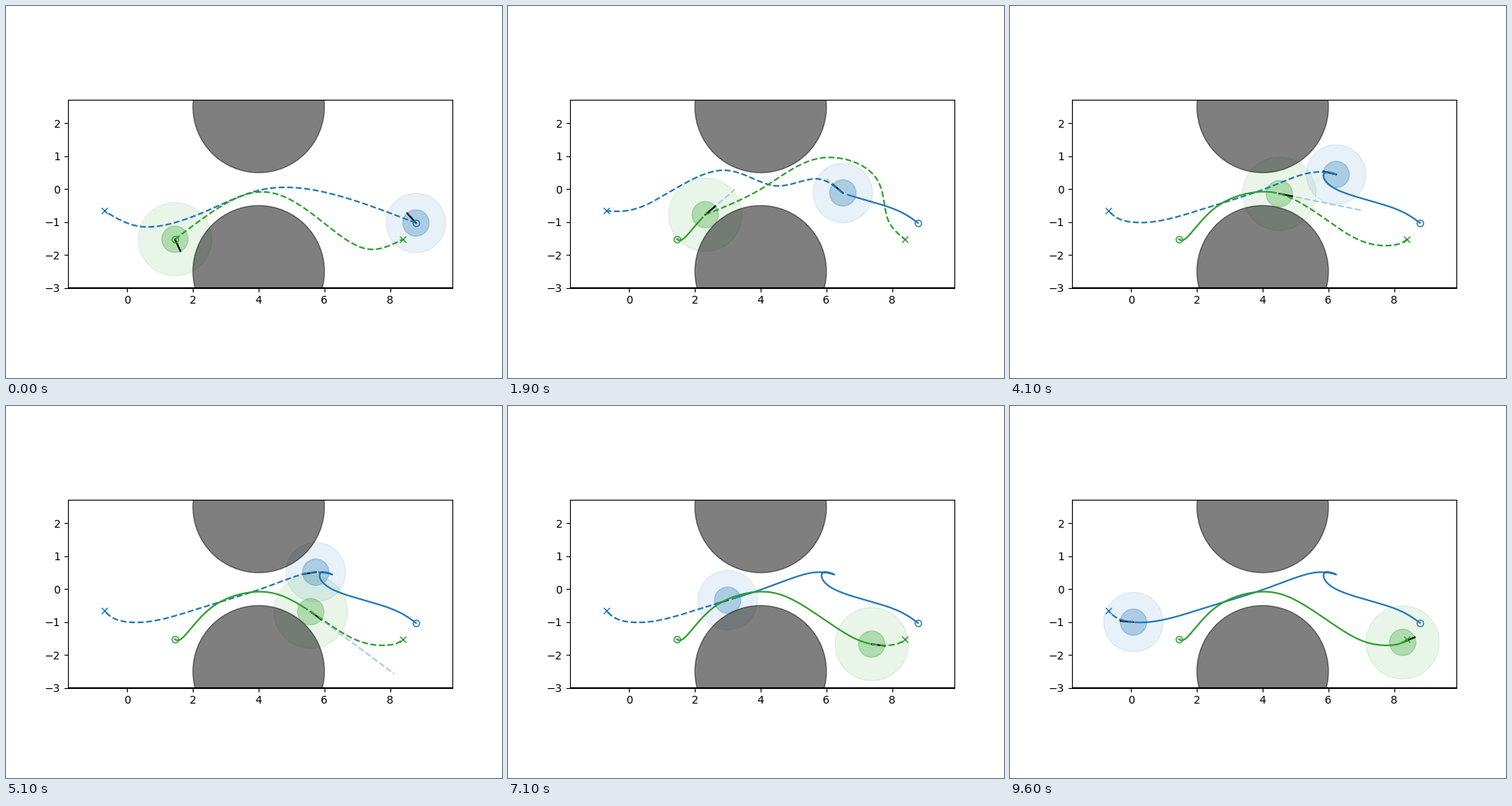
Write a matplotlib script that moves like this. It is 640 px wide and 480 px high and loops after 9700 ms.

```python
import numpy as np
import matplotlib.pyplot as plt
from matplotlib.animation import FuncAnimation
from matplotlib.patches import Circle

FRAMES, STEP = 97, 0.1
SCALE, X0, Y0 = 42.42, 156.35, 236.3   # stage pixels per unit, stage origin
POSE_STEP = 1.05                       # seconds between key poses
ROUTE_TIMES = (0, 1.9, 3.2)            # when each detour is planned
HEADING_LEN = 0.4

fig, ax = plt.subplots(figsize=(6.4, 4.8), dpi=100)
ax.set_xlim(-1.8, 9.893)
ax.set_ylim(-3, 2.712)
ax.set_aspect("equal")


def to_data(points):
    """Stage pixels to data units; further columns stay as they are."""
    p = np.array(points, float)
    p[:, 0] = (p[:, 0] - X0) / SCALE
    p[:, 1] = (Y0 - p[:, 1]) / SCALE
    return p


def spline(u, p):
    """Natural cubic spline through points p at knots u."""
    n, h = len(u), np.diff(u)
    slope = np.diff(p, axis=0) / h[:, None]
    a, rhs = np.eye(n), np.zeros_like(p)
    for i in range(1, n - 1):
        a[i, i - 1:i + 2] = h[i - 1], 2 * (h[i - 1] + h[i]), h[i]
        rhs[i] = 6 * (slope[i] - slope[i - 1])
    m = np.linalg.solve(a, rhs)

    def curve(s):
        s = np.atleast_1d(s)
        i = np.clip(np.searchsorted(u, s, side="right") - 1, 0, n - 2)
        w = h[i][:, None]
        b = (s - u[i])[:, None] / w
        c = 1 - b
        bend = ((c**3 - c) * m[i] + (b**3 - b) * m[i + 1]) * w**2 / 6
        return c * p[i] + b * p[i + 1] + bend

    return curve


def arc(p):
    """Length along a polyline at each of its points."""
    return np.r_[0, np.cumsum(np.hypot(*np.diff(p, axis=0).T))]


def resample(p, n=240):
    d = arc(p)
    s = np.linspace(0, d[-1], n)
    return np.column_stack([np.interp(s, d, col) for col in p.T])


def smooth(p):
    u = np.r_[0, np.cumsum(np.sqrt(np.diff(arc(p))))]
    return resample(spline(u, p)(np.linspace(0, u[-1], 400)))


class Agent:
    """Drives through key poses (x, y, heading) evenly spaced in time."""

    def __init__(self, color, radius, poses, routes, guess_color, guess_rate,
                 guess_end):
        times = POSE_STEP * np.arange(len(poses))
        self.end = times[-1]
        self.pose = spline(times, to_data(poses))
        self.vias = np.array([to_data(r).ravel() for r in routes])
        self.guess_rate, self.guess_end = guess_rate, guess_end

        self.ring = ax.add_patch(Circle((0, 0), radius, color=color, alpha=0.1))
        self.disc = ax.add_patch(Circle((0, 0), 0.4, color=color, alpha=0.3))
        self.guess, = ax.plot([], [], "--", color=guess_color)
        self.nose, = ax.plot([], [], color="black")
        self.trail, = ax.plot([], [], color=color)
        self.plan, = ax.plot([], [], "--", color=color)
        for t, marker in ((0, "o"), (self.end, "x")):
            ax.plot(*self.path(t, t)[0], marker, color=color, mfc="none")

    def path(self, start, stop):
        return self.pose(np.linspace(start, stop, 300))[:, :2]

    def planned(self, t):
        """The current detour, fading into the way really taken."""
        rest = self.path(t, self.end)
        fade = t - ROUTE_TIMES[-1]
        if fade >= 1:
            return rest
        via = np.array([np.interp(t, ROUTE_TIMES, col) for col in self.vias.T])
        route = smooth(np.vstack((rest[0], via.reshape(-1, 2), rest[-1])))
        return route + max(fade, 0) * (resample(rest) - route)

    def update(self, t):
        x, y, heading = self.pose(t)[0]
        angle = np.radians(heading)
        reach = self.guess_rate * t if t < self.guess_end else 0
        self.ring.center = self.disc.center = x, y
        for line, length in ((self.nose, HEADING_LEN), (self.guess, reach)):
            line.set_data([x, x + length * np.cos(angle)],
                          [y, y + length * np.sin(angle)])
        self.plan.set_data(*self.planned(t).T)
        self.trail.set_data(*self.path(0, max(t - STEP, 0)).T)


blue = Agent(
    "tab:blue", 0.905,
    poses=[(529, 280, 132), (490, 259, 161), (421, 236.5, 138),
           (406.5, 215, 168), (421, 217.5, 167), (393, 215, 192),
           (333.5, 234.5, 197), (267.5, 255.5, 198), (204, 274.5, 192),
           (163.5, 279.2, 177), (140, 274.5, 155), (127, 264.5, 130)],
    routes=[[(410, 240), (330, 237), (260, 264), (178, 285)],
            [(398, 223), (345, 232), (276, 212), (175, 258)],
            [(423, 220), (388, 206), (330, 236), (170, 281)]],
    guess_color="#b4d9b4", guess_rate=0.35, guess_end=2.4,
)
green = Agent(
    "tab:green", 1.115,
    poses=[(218, 301, -65), (230, 297, 38), (262, 262.5, 35),
           (306, 242, 9), (352, 243.5, -14), (400, 270, -38),
           (443.5, 298, -22), (476, 308.3, -4), (497.5, 308, 10),
           (506, 305.4, 22), (510, 303, 27), (512, 301, 30)],
    routes=[[(250, 277), (326, 240), (400, 272), (466, 313.5)],
            [(330, 234), (405, 196), (475, 222), (490, 275)],
            [(350, 243), (395, 266), (435, 299), (480, 313)]],
    guess_color="#a8cdd6", guess_rate=0.62, guess_end=5.6,
)

for y in (2.5, -2.5):
    ax.add_patch(Circle((4, y), 2, color="black", alpha=0.5))
ax.axhline(-3, color="black")


def draw(frame):
    for agent in (blue, green):
        agent.update(frame * STEP)
    return []


anim = FuncAnimation(fig, draw, frames=FRAMES, interval=100, repeat=True,
                     repeat_delay=0)
plt.show()
```
